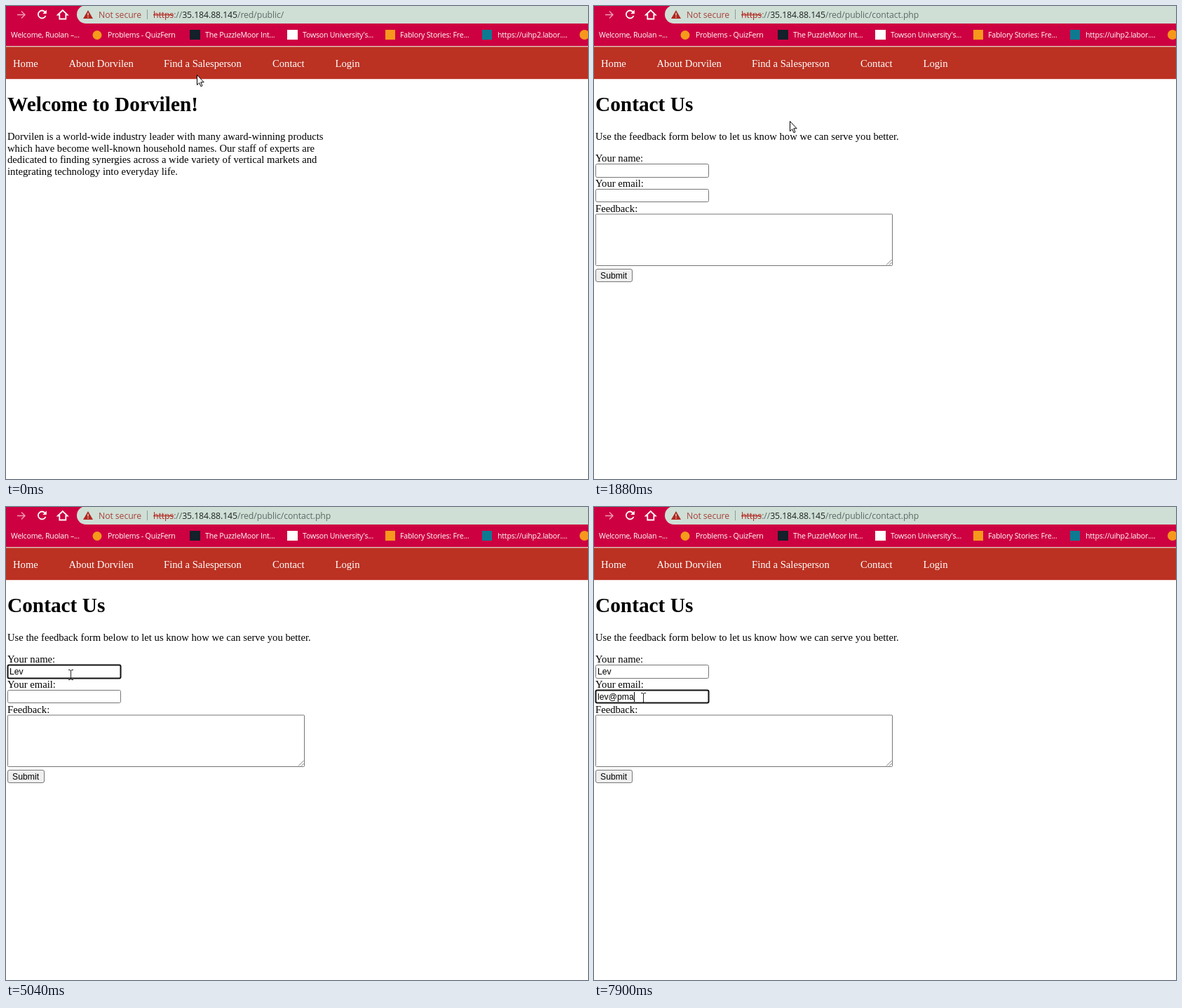
Recreate the animation shown at these times as an HTML page. Size 830x675 px, loop 8000 ms.

```html
<!DOCTYPE html>
<html lang="en">
<head>
<meta charset="utf-8">
<title>Contact form</title>
<style>
  html, body { margin: 0; width: 100%; height: 100%; overflow: hidden; background: #fff; }
  svg { display: block; width: 830px; height: 675px; }
  text { white-space: pre; }
  .page { font: 14.667px "Liberation Serif", "Times New Roman", serif; }
  .title { font-size: 29.33px; font-weight: bold; }
  .ui { font: 10.6px "Open Sans", "Noto Sans", sans-serif; letter-spacing: -.2px; fill: #fff; }
  .url { font-size: 12.3px; letter-spacing: -.1px; }
  .field { font: 12.22px "Liberation Sans", Arial, sans-serif; }
  .box { fill: #fff; stroke: #767676; }
  .focus { stroke: #101010; stroke-width: 2; }
  .cursor { fill: #fff; stroke: #000; stroke-linejoin: round; }
  #glow { fill: #ffff3c; mix-blend-mode: multiply; }
</style>
</head>
<body>
<svg viewBox="0 0 830 675">
  <rect width="830" height="58" fill="#cd0141"/>
  <g fill="none" stroke="#fff" stroke-width="1.8">
    <path d="M16 12.500H27M22 7.500L27 12.500L22 17.500" stroke="#ee9db6" stroke-width="1.400"/>
    <path d="M56 9A5.500 5.500 0 1 0 56.500 14"/>
    <path d="M57.800 5.500V11H52.300Z" fill="#fff" stroke="none"/>
    <path d="M74 12.500L80.800 6L87.600 12.500H85.300V18.500H76.300V12.500Z"/>
  </g>
  <rect x="101" y="-1" width="760" height="26" rx="13" fill="#cfdfd6"/>
  <path d="M117 6L124 18H110Z" fill="#b3261e"/>
  <path d="M117 9.800V13.800M117 15V16.500" stroke="#cfdfd6" stroke-width="1.400"/>
  <path d="M201.500 5V19" stroke="#8d9c95"/>
  <g class="ui">
    <text class="url" x="132" y="17" fill="#a8403a">Not secure</text>
    <text class="url" x="210" y="17" fill="#5c6a64"><tspan fill="#b3261e" text-decoration="line-through">https</tspan>://<tspan fill="#1c211f">35.184.88.145</tspan>/red/public/<tspan id="file"></tspan></text>
    <g id="marks"></g>
  </g>
  <circle cx="130" cy="41.500" r="6.500" fill="#f59a1b"/>
  <rect x="262" y="34" width="15" height="14" fill="#14202a"/>
  <rect x="401" y="34" width="15" height="14" fill="#fff"/>
  <rect x="541" y="34" width="14" height="14" fill="#f7981d"/>
  <rect x="679" y="34" width="14" height="14" fill="#0c7a91"/>
  <circle cx="825" cy="41" r="7" fill="#f7981d"/>
  <rect y="57" width="830" height="1.300" fill="#dcc6bd"/>
  <rect y="58.300" width="830" height="45.900" fill="#bb3122"/>
  <g id="nav" class="page" fill="#fff"></g>

  <g id="home" class="page">
    <text class="title" x="2" y="150">Welcome to Dorvilen!</text>
  </g>

  <g id="contact" class="page">
    <text class="title" x="2" y="150">Contact Us</text>
    <text x="2" y="191">Use the feedback form below to let us know how we can serve you better.</text>
    <text x="2" y="222">Your name:</text>
    <text x="2" y="258">Your email:</text>
    <text x="2" y="293.500">Feedback:</text>
    <rect id="nameBox" x="2.500" y="225.500" width="161" height="19" rx="2"/>
    <rect id="mailBox" x="2.500" y="261.500" width="161" height="18" rx="2"/>
    <rect class="box" x="2.500" y="297" width="423" height="73.500" rx="1"/>
    <path d="M417 369.500L424.500 362M421 369.500L424.500 366" stroke="#777"/>
    <rect class="box" x="2.500" y="375.500" width="52" height="18" rx="2.500" style="fill:#efefef"/>
    <g class="field">
      <text x="9" y="388.500">Submit</text>
      <text id="name" x="5" y="239"></text>
      <text id="mail" x="5" y="275"></text>
    </g>
    <rect id="caret" width="1" height="14"/>
  </g>

  <circle id="glow" r="13.500"/>
  <g id="pointer">
    <path id="arrow" class="cursor" d="M.500 .500V14.700L3.700 11.700L5.900 16.700L8 15.800L5.800 10.800H10.200Z"/>
    <path id="hand" class="cursor" d="M-2 1.800Q-2 .500 -.500 .500T1 1.800V7Q3 5.800 4 7.600Q6 6.600 7 8.400Q9.500 7.600 9.500 10V14Q9.500 17 8 18.500V21.500H-1V19.500L-5 13.500Q-6 11.500 -5 11Q-3.500 10.500 -2 13ZM1 7V11M4 8V11.500M7 9V12"/>
    <path id="beam" fill="none" stroke="#222" d="M-3 -6.500H-1L.500 -5.500L2 -6.500H4M.500 -6V7M-3 7.500H-1L.500 6.500L2 7.500H4"/>
  </g>
</svg>
<script>
const LOOP = 8000, BLINK = 530, LOAD = 1080, NAME_CLICK = 2230, MAIL_CLICK = 5440;
const $ = id => document.getElementById(id);
const show = (el, on) => el.setAttribute("visibility", on ? "visible" : "hidden");

function addText(parent, x, y, str) {
  const el = document.createElementNS("http://www.w3.org/2000/svg", "text");
  el.setAttribute("x", x);
  el.setAttribute("y", y);
  el.textContent = str;
  parent.append(el);
}

[[10, "Home"], [89.5, "About Dorvilen"], [225, "Find a Salesperson"], [380, "Contact"], [469.5, "Login"]]
  .forEach(([x, str]) => addText($("nav"), x, 87, str));

[[7, "Welcome, Ruolan –..."], [145, "Problems - QuizFern"], [284, "The PuzzleMoor Int..."],
 [423, "Towson University's..."], [562, "Fablory Stories: Fre..."], [701, "https://uihp2.labor...."]]
  .forEach(([x, str]) => addText($("marks"), x, 45, str));

["Dorvilen is a world-wide industry leader with many award-winning products",
 "which have become well-known household names. Our staff of experts are",
 "dedicated to finding synergies across a wide variety of vertical markets and",
 "integrating technology into everyday life."]
  .forEach((str, i) => addText($("home"), 2, 191 + i * 16.5, str));

// Pointer moves: start time, step length, step count, Bezier points
const moves = [
  { at: 70, dt: 68.5, n: 8, pts: [[272, 98], [300, 126], [375, 120], [405, 81]] },
  { at: 1670, dt: 70, n: 9, pts: [[405, 81], [330, 120], [170, 262], [87, 239]] },
  { at: 2360, dt: 60, n: 1, pts: [[87, 239], [88, 239], [91, 239], [92, 239]] },
  { at: 5100, dt: 66.5, n: 6, pts: [[92, 239], [96, 410], [70, 410], [70, 272]] }
];
const clicks = [[880, LOAD], [NAME_CLICK, 2360], [MAIL_CLICK, 5630]];
const nameKeys = [3370, 3570, 4170];
const mailKeys = [6320, 6450, 6840, 7310, 7640, 7840, 7900];

function bezier([a, b, c, d], u) {
  const v = 1 - u;
  return [0, 1].map(i => v * v * v * a[i] + 3 * v * v * u * b[i] + 3 * v * u * u * c[i] + u * u * u * d[i]);
}

function pointerAt(t) {
  const m = moves.filter(m => t >= m.at).pop();
  if (!m) return moves[0].pts[0];
  const p = Math.min(1, (Math.floor((t - m.at) / m.dt) + 1) / m.n);
  return bezier(m.pts, p * p * (3 - 2 * p)).map(Math.round);
}

function cursorKind(x, y, onForm) {
  const inside = (l, t, r, b) => x >= l && x <= r && y >= t && y <= b;
  if (inside(380, 74, 426, 91)) return "hand";
  const overText = inside(2, 178, 434, 195) || inside(2, 226, 164, 244) ||
    inside(2, 262, 164, 280) || inside(2, 297, 426, 369);
  return onForm && overText ? "beam" : "arrow";
}

function setField(id, str, keys, t, focused) {
  $(id).textContent = str.slice(0, keys.filter(k => t >= k).length);
  $(id + "Box").setAttribute("class", focused ? "box focus" : "box");
}

function drawCaret(t) {
  const mail = t >= MAIL_CLICK;
  const times = mail ? [MAIL_CLICK, ...mailKeys] : [NAME_CLICK, ...nameKeys];
  const last = times.filter(k => t >= k).pop();
  const on = last !== undefined && Math.floor((t - last) / BLINK) % 2 === 0;
  show($("caret"), on);
  if (!on) return;
  const field = $(mail ? "mail" : "name");
  const width = field.textContent ? field.getComputedTextLength() : 0;
  $("caret").setAttribute("x", Math.round(5 + width));
  $("caret").setAttribute("y", mail ? 264 : 228);
}

function draw(t) {
  const onForm = t >= LOAD;
  $("file").textContent = onForm ? "contact.php" : "";
  $("home").style.display = onForm ? "none" : "";
  $("contact").style.display = onForm ? "" : "none";
  setField("name", "Lev", nameKeys, t, t >= NAME_CLICK && t < MAIL_CLICK);
  setField("mail", "lev@pma", mailKeys, t, t >= MAIL_CLICK);
  drawCaret(t);

  const [x, y] = pointerAt(t);
  const kind = cursorKind(x, y, onForm);
  $("pointer").setAttribute("transform", `translate(${x} ${y})`);
  for (const id of ["arrow", "hand", "beam"]) show($(id), id === kind);
  $("glow").setAttribute("cx", x - 1);
  $("glow").setAttribute("cy", y - .5);
  show($("glow"), clicks.some(([a, b]) => t >= a && t < b));
}

const start = performance.now();
function tick() {
  draw((performance.now() - start) % LOOP);
  requestAnimationFrame(tick);
}
tick();
</script>
</body>
</html>
```
